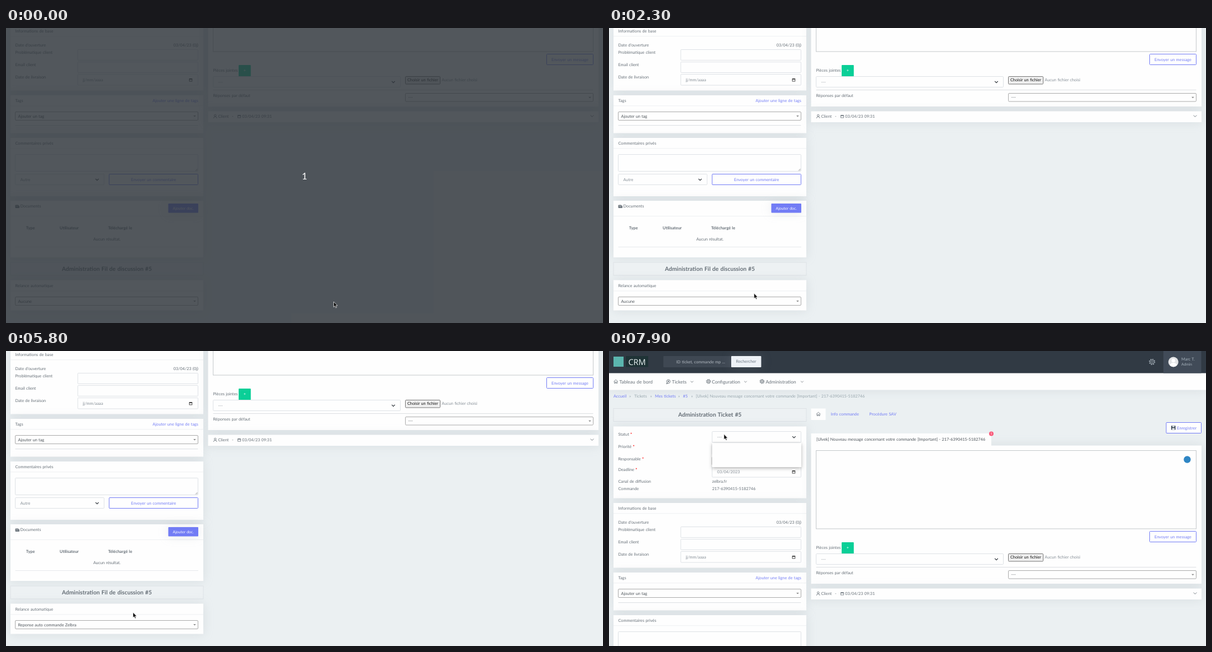
An HTML page for the animation above (8000 ms loop, 1065x526 px).

```html
<!DOCTYPE html>
<html lang="fr">
<head>
<meta charset="utf-8">
<title>Ticket</title>
<style>
html, body { margin: 0; height: 100%; overflow: hidden; background: #ebf0f2; }
svg { display: block; width: 100vw; height: 100vh; }
text { font-family: Lato, sans-serif; word-spacing: .06em; text-rendering: geometricPrecision; white-space: pre; }
.card { filter: drop-shadow(0 0 9px rgba(140, 150, 160, .2)); }
.pop { filter: drop-shadow(0 2px 3px rgba(0, 0, 0, .3)); }
</style>
</head>
<body>
<svg id="stage" viewBox="0 0 1065 526" preserveAspectRatio="none"></svg>
<script>
const GRAY = '#666f77', DARK = '#4b5258', PALE = '#98a6ad', BLUE = '#727cf5', MID = '#858e96';
const ORDER = '217-6390415-5182746';
const SUBJECT = `[Ulvek] Nouveau message concernant votre commande [Important] - ${ORDER}`;
const AUTO_REPLY = 'Reponse auto commande Zelbra';

// Drawing helpers: boxes take two corners, text takes its vertical centre.
const box = (x1, y1, x2, y2, fill = '#fefefe', stroke = 'none', extra = '') =>
  `<rect x="${x1}" y="${y1}" width="${x2 - x1}" height="${y2 - y1}" fill="${fill}" stroke="${stroke}" ${extra}/>`;
const text = (x, y, str, fill = GRAY, size = 7.3, anchor = 'start', extra = '') =>
  `<text x="${x}" y="${y + size * .36}" fill="${fill}" font-size="${size}" text-anchor="${anchor}" ${extra}>${str}</text>`;
const bold = (x, y, str, size = 7.3, anchor = 'start') =>
  text(x, y, str, GRAY, size, anchor, 'font-weight="700"');
const path = (d, stroke = GRAY, width = 1, fill = 'none', extra = '') =>
  `<path d="${d}" stroke="${stroke}" stroke-width="${width}" fill="${fill}" ${extra}/>`;
const circle = (x, y, r, fill, stroke = 'none', extra = '') =>
  `<circle cx="${x}" cy="${y}" r="${r}" fill="${fill}" stroke="${stroke}" ${extra}/>`;
const line = (x1, y, x2, color = '#e6e9ec') => path(`M${x1} ${y}H${x2}`, color);
const card = (x1, y1, x2, y2) => box(x1, y1, x2, y2, '#fefefe', 'none', 'class="card"');
const chevron = (x, y, w = 2.8, color = '#343a40', width = 1.3) =>
  path(`M${x - w} ${y - w / 2}l${w} ${w}l${w} ${-w}`, color, width);
const field = (x1, y1, x2, y2) => box(x1, y1, x2, y2, '#fefefe', '#dee2e6', 'rx="1.2"');
const select = (x1, y1, x2, y2, label) => field(x1, y1, x2, y2) +
  text(x1 + 9, (y1 + y2) / 2, label, MID) + chevron(x2 - 12.5, (y1 + y2) / 2 + .3);
const triangle = (x, y, dir = 1) =>
  path(`M${x - 2.3} ${y - dir}h4.6l-2.3 ${2.6 * dir}z`, 'none', 0, '#888');
const picker = (x1, y1, x2, y2, label) => box(x1, y1, x2, y2, '#fefefe', '#aaa', 'rx="1.5"') +
  text(x1 + 5, (y1 + y2) / 2, label, DARK) + triangle(x2 - 6, (y1 + y2) / 2);
const calendar = (x, y, color = '#222') => box(x - 2.4, y - 1.8, x + 2.4, y + 2.5, 'none', color, 'stroke-width=".8"') +
  path(`M${x - 2.4} ${y - 1.4}h4.8`, color, 1.3);
const date = (x1, y1, x2, y2, label) => field(x1, y1, x2, y2) +
  text(x1 + 9, (y1 + y2) / 2, label, MID) + calendar(x2 - 13, (y1 + y2) / 2 + .2);
const button = (x1, y1, x2, y2, label, shift = 0) => box(x1, y1, x2, y2, '#fefefe', BLUE, 'rx="1"') +
  text((x1 + x2) / 2 + shift, (y1 + y2) / 2, label, BLUE, 7.3, 'middle');
const heading = (y, label) => text(16.5, y, label) + line(8, y + 9.5, 352, '#eef0f2');
const titleBox = (y, label) => box(8, y, 352, y + 23, '#edf1f3', '#dde2e6') + bold(180, y + 11, label, 10.2, 'middle');
const required = (y, label) => text(16.5, y, `${label} <tspan fill="#f00" font-weight="700">*</tspan>`);
const house = (x, y, color = GRAY) =>
  path(`M${x - 3.6} ${y}l3.6 -3.3l3.6 3.3M${x - 2.5} ${y - .6}v3.6h1.7v-2.2h1.6v2.2h1.7v-3.6`, color, .8);
const gear = (x, y, r, color) => circle(x, y, r, 'none', color, `stroke-width="${r * .3}" stroke-dasharray="${r * .4} ${r * .385}"`) +
  circle(x, y, r * .76, 'none', color, 'stroke-width=".8"') + circle(x, y, r * .34, 'none', color, 'stroke-width=".8"');

const topBar = () =>
  box(0, 39, 1065, 69.5, '#fefefe', 'none', 'class="card"') + box(0, 0, 1065, 39.5, '#313a44') +
  box(8, 10, 26, 28, '#5bb5ae') + box(30, 9, 70, 28.5, '#1f3336') +
  text(50, 19.3, 'CRM', '#e9f2f2', 14.5, 'middle', 'style="font-family:Open Sans,sans-serif"') +
  box(97, 9, 218, 29, '#3f4853', 'none', 'rx="1.2"') + text(120, 19, 'ID ticket, commande mp ...', '#b3bac2') +
  box(218, 9, 271.5, 29, '#eef2f7', 'none', 'rx="1" class="card"') + text(244.7, 18.7, 'Rechercher', '#6c7784', 7.3, 'middle') +
  gear(968.8, 19.4, 4.8, '#aab4bd') + box(989, 0, 1056.5, 39.5, '#414b58') +
  circle(1006.8, 19.5, 9, '#e3e4e6') + circle(1006.8, 17, 3.2, '#fff') +
  path('M1000.8 26q.4-5 6-5t6 5q-6 4.600-12 0', 'none', 0, '#fff') +
  text(1021, 14.7, 'Marc T.', '#a8b4bd') + text(1021, 23.6, 'Admin', '#a8b4bd', 6.7) +
  house(12.2, 54.5) + text(18.5, 54.5, 'Tableau de bord', GRAY, 8.4) +
  circle(106, 54.3, 3.2, 'none', GRAY, 'stroke-width=".9"') + circle(106, 54.3, 1.2, GRAY) +
  path('M103.500 56.500l-1 2l2.500-.8') + text(112.3, 54.5, 'Tickets', GRAY, 8.4) +
  gear(177.5, 54.3, 3.7, GRAY) + text(183.5, 54.5, 'Configuration', GRAY, 8.4) +
  gear(273, 54.3, 3.7, GRAY) + text(279.5, 54.5, 'Administration', GRAY, 8.4) +
  [148, 243.5, 344.5].map(x => chevron(x, 54.8, 2.3, GRAY, .8)).join('') +
  [[8, 'Accueil', BLUE], [45, 'Tickets', PALE], [82, 'Mes tickets', BLUE], [132, '#5', BLUE], [155, SUBJECT, PALE]]
    .map(([x, label, color]) => text(x, 80.3, label, color)).join('') +
  [37.5, 75, 124.7, 148].map(x => text(x, 80, '»', PALE, 7.3, 'middle')).join('');

const leftColumn = () =>
  titleBox(102.5, 'Administration Ticket #5') +
  card(8, 134.5, 352, 262.5) +
  required(148, 'Statut') + required(170.3, 'Priorité') + required(192.5, 'Responsable') + required(211, 'Deadline') +
  text(16.5, 232.6, 'Canal de diffusion') + text(16.5, 245.4, 'Commande') +
  select(184, 143.5, 342.5, 163, '---') + select(184, 165.5, 342.5, 185, 'P1') +
  picker(184, 188.5, 342.5, 203.5, 'Marc T.') + date(184, 205.5, 342.5, 225, '03/04/2023') +
  text(184, 232.6, 'zelbra.fr') + text(184, 245.4, ORDER) +

  card(8, 271, 352, 386.5) + heading(280.3, 'Informations de base') +
  text(16.5, 305.3, "Date d'ouverture") + text(343, 305.3, '03/04/23 (0j)', GRAY, 7.3, 'end') +
  text(16.5, 318.4, 'Problématique client') + text(16.5, 340, 'Email client') + text(16.5, 362.4, 'Date de livraison') +
  field(128, 313.5, 342.5, 332.5) + field(128, 335.5, 342.5, 354.5) + date(128, 357.5, 342.5, 377, 'jj/mm/aaaa') +

  card(8, 395, 352, 462.5) + heading(404.3, 'Tags') + text(343, 404.3, 'Ajouter une ligne de tags', BLUE, 7.3, 'end') +
  picker(16.5, 424.5, 342.5, 439.5, 'Ajouter un tag') + line(16.5, 448.7, 342.5, '#d9dde1') +

  card(8, 471, 352, 575) + heading(480.3, 'Commentaires privés') +
  field(16.5, 500.5, 342.5, 530.5) + path('M338 529.500l3.500-3.500M340 529.500l1.500-1.500', '#777', .7) +
  select(16.5, 535.5, 175, 554.5, 'Autre') + button(184, 535.5, 342.5, 554.5, 'Envoyer un commentaire') +

  card(8, 583, 352, 684) + path('M17 591h5v1.500h1.500v3h-6.500zM17 594h6.500', GRAY, 1, '#9aa1a7') +
  text(25.5, 592.7, 'Documents') + line(8, 610.5, 352, '#eef0f2') +
  box(289.5, 588, 343, 604.5, BLUE, 'none', 'rx="1" class="card"') + text(316.2, 596.3, 'Ajouter doc.', '#fff', 6.9, 'middle') +
  bold(43.5, 631.8, 'Type', 7.3, 'middle') + bold(95.8, 631.8, 'Utilisateur') + bold(182.3, 631.8, 'Téléchargé le') +
  text(180, 651, 'Aucun résultat.', GRAY, 7.3, 'middle') + line(16.5, 665.5, 343) +

  titleBox(693, 'Administration Fil de discussion #5') +
  card(8, 724.5, 352, 778.5) + heading(734.4, 'Relance automatique') +
  box(16.5, 754.5, 342.5, 769.5, '#fefefe', '#aaa', 'rx="1.5"') + '<g id="relance"></g>';

const rightColumn = () =>
  box(360.5, 102.5, 386.5, 123) + house(373.5, 112.5) +
  text(395.7, 112.3, 'Info commande', BLUE) + text(464.2, 112.3, 'Procédure SAV', BLUE) +
  button(994, 127.5, 1056.5, 146.5, 'Enregistrer', 5.5) +
  box(1003, 133.3, 1010.5, 140.5, '#2f3c4c') + box(1004.7, 133.3, 1008.8, 136, '#cfd6dc') + box(1004.4, 137.5, 1009.1, 140.5, '#eef1f4') +
  card(360.5, 168.5, 1057, 415) + box(360.5, 147, 682, 169) + text(370, 157, SUBJECT, DARK) +
  circle(682, 147.5, 4, '#fa5c7c') + text(682, 147.5, '1', '#fff', 5.2, 'middle') +
  box(369.5, 177.5, 1047.5, 317, '#fefefe', '#c4c8cb') + circle(1031.5, 193.5, 6.2, '#2f86c4') +
  button(964.5, 321.5, 1047.5, 340.5, 'Envoyer un message') +
  text(369.5, 350.6, 'Pièces jointes') + box(415, 341, 436.7, 361.5, '#0acf97', 'none', 'rx="1"') +
  text(425.9, 350.8, '+', '#fff', 7.3, 'middle') +
  select(369.5, 361.5, 703.5, 380.5, '---') +
  box(712.5, 361.5, 774.5, 375, '#efefef', '#767676', 'rx="1.3"') + text(743.5, 367.8, 'Choisir un fichier', '#111', 7.3, 'middle') +
  text(777.3, 367.8, 'Aucun fichier choisi', MID) + line(369.5, 385.5, 1047.5, '#dcdfe2') +
  text(369.5, 395.3, 'Réponses par défaut') + picker(712.5, 391.5, 1047.5, 406, '---') +
  card(360.5, 423.5, 1057, 443) + circle(373.2, 431, 1.7, 'none', GRAY, 'stroke-width=".8"') +
  path('M370.300 436q.3-3 2.900-3t2.900 3', GRAY, .8) + text(378.5, 432.7, 'Client') + text(404.3, 432.7, '-', GRAY, 7.3, 'middle') +
  calendar(416, 432.5, GRAY) + text(421.2, 432.7, '03/04/23 09:31') + chevron(1045.5, 432, 2.8, GRAY, .9);

const relance = (label, open) => text(21.5, 762, label, DARK) + triangle(336.5, 762, open ? -1 : 1);

function optionList(t) {
  const second = t >= 3900, focus = t >= 3300 && t < 4800;
  const caret = focus && (t < 3800 || t >= 4400);
  const option = (y1, y2, label, active, chosen) =>
    box(17, y1, 342, y2, active ? '#5897fb' : chosen ? '#ddd' : '#fefefe') +
    text(21, (y1 + y2) / 2 - .6, label, active ? '#fff' : GRAY);
  return box(16.5, 697.5, 342.5, 754.5, '#fefefe', '#aaa') +
    box(19.5, 701, 339.5, 715.5, '#fefefe', focus ? '#777' : '#aaa') +
    (caret ? box(22, 703, 22.8, 714, '#222') : '') +
    option(719, 736.5, 'Aucune', !second, true) + option(736.5, 754, AUTO_REPLY, second, false);
}

const ARROW = path('M0 0V9.600L2.200 7.600L3.800 11L5.400 10.300L3.900 7H6.800Z', '#fff', .7, '#111');
const HAND = path('M-1.100 1Q0-.6 1.100 1V4L5 4.800Q6.600 5.200 6.200 7L5.400 10.200H.2L-3 6.600Q-2.600 5.200-1.100 6Z', '#fff', .6, '#111');

stage.innerHTML = `<g id="page">${topBar()}${leftColumn()}${rightColumn()}<g id="options"></g>` +
  `<g id="statusMenu">${box(184, 164, 343, 207, '#fefefe', 'none', 'class="pop"')}</g></g>` +
  `<g id="veil">${box(0, 0, 1065, 526, '#30353b', 'none', 'fill-opacity=".83"')}${text(532.5, 263.7, '1', '#fff', 16.5, 'middle')}</g>` +
  `<g id="cursor"></g>`;

// Linear track through [time, ...values] keys.
function track(t, keys) {
  const i = keys.findIndex(k => k[0] > t);
  if (i < 0) return keys.at(-1).slice(1);
  const a = keys[i - 1] || keys[0], b = keys[i];
  const p = b[0] > a[0] ? (t - a[0]) / (b[0] - a[0]) : 0;
  return a.slice(1).map((v, k) => v + (b[k + 1] - v) * p);
}
const POINTER = [
  [0, 584.5, 488], [900, 405, 452], [1200, 360, 450.5], [1800, 292, 463], [2700, 232, 481],
  [2900, 234, 485], [3700, 234, 485], [4000, 226.5, 466], [6400, 226.5, 466], [6600, 224, 438],
  [6900, 206, 310], [7200, 194, 196], [7300, 199.5, 175.5], [7600, 205, 148.3]
];
const SCROLL = [[0, 275], [5700, 275], [5800, 274], [5900, 228], [6000, 144], [6100, 50], [6200, 0]];
const byId = id => document.getElementById(id);
const show = (id, on) => byId(id).setAttribute('visibility', on ? 'visible' : 'hidden');
const move = (id, x, y) => byId(id).setAttribute('transform', `translate(${x} ${y})`);

function render(t) {
  const open = t >= 3200 && t < 5000;
  move('page', 0, -Math.round(track(t, SCROLL)[0]));
  move('cursor', ...track(t, POINTER));
  byId('cursor').innerHTML = t >= 2800 && t < 5000 ? HAND : ARROW;
  byId('veil').setAttribute('opacity', Math.max(0, 1 - t / 900));
  byId('relance').innerHTML = relance(t < 5000 ? 'Aucune' : AUTO_REPLY, open);
  byId('options').innerHTML = open ? optionList(t) : '';
  show('statusMenu', t >= 7900);
}

let last = -1;
const start = performance.now();
function tick() {
  const t = Math.floor((performance.now() - start) % 8000 / 100) * 100;
  if (t !== last) render(last = t);
  requestAnimationFrame(tick);
}
tick();
</script>
</body>
</html>
```
